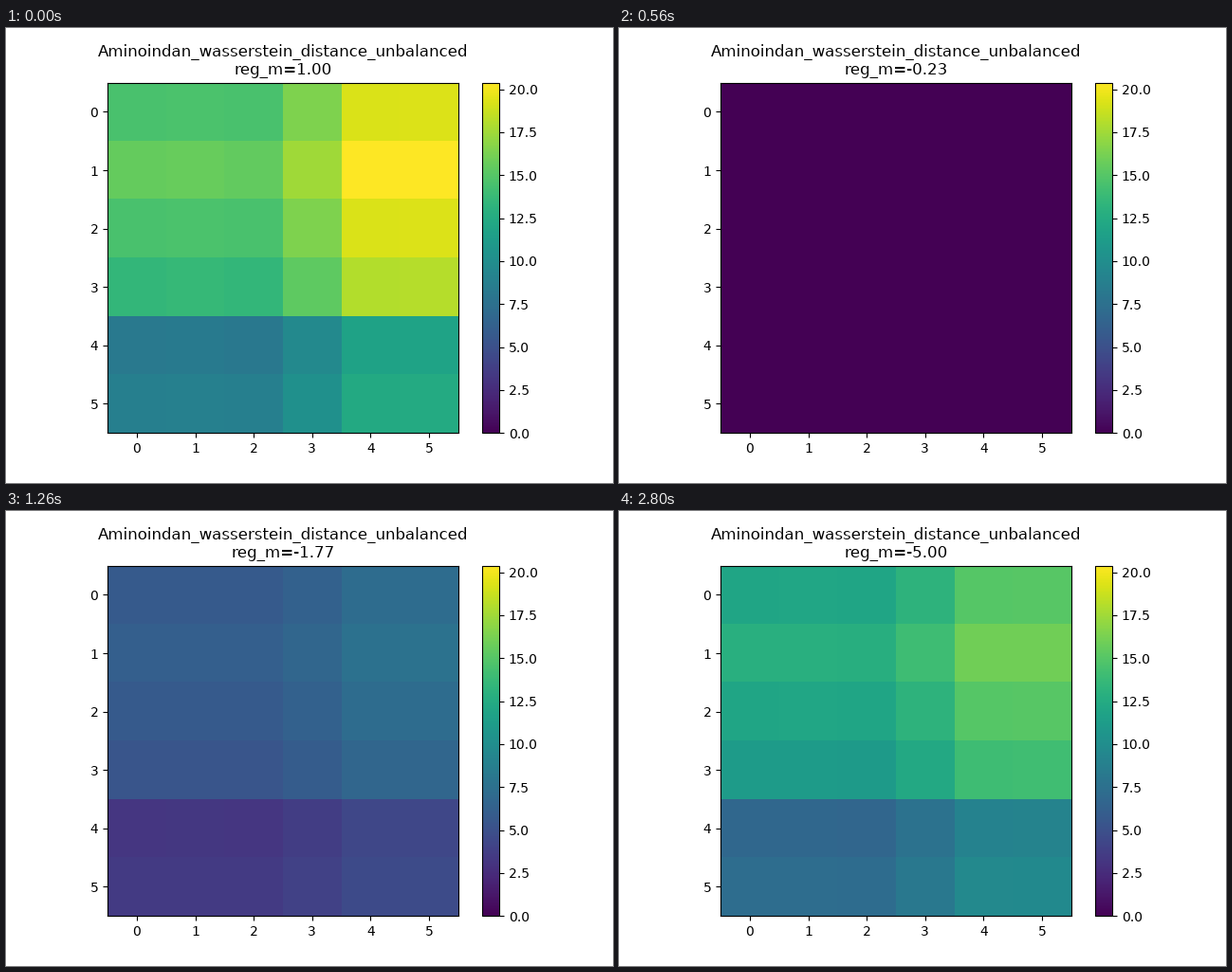
These frames come from a looping animation (640 px wide and 480 px high, 2940 ms). A matplotlib script:

```python
import numpy as np
import matplotlib.pyplot as plt
from matplotlib.animation import FuncAnimation

plt.rcParams["text.hinting"] = "native"
plt.rcParams["text.kerning_factor"] = 6

FRAMES, INTERVAL = 21, 140
VMAX = 20.39

# every second value of the sweep, closing on its last one
sweep = np.linspace(1, -5, 40)
regs = np.append(sweep[::2], sweep[-1])

# relative distance of each row, and what each column adds to it
ROWS = np.array([1, 1.07, 1, 0.93, 0.565, 0.605])[:, None]
COLS = np.array([0, 0.02, -0.01, 0.4, 1, 1.02])

# level over reg when positive, log level over 1 / |reg| when negative
rise = np.polyfit([0.077, 0.692, 1], [1.25, 11.95, 14.55], 2)
decay = np.polyfit([0.2, 0.371, 0.867], np.log([12, 8.65, 2.83]), 2)


def matrix(reg):
    spread = 0.32 if reg > 0 else 0.25
    pattern = ROWS + spread * np.sqrt(ROWS) * COLS
    if reg > 0:
        contrast = 1 - np.exp(-(reg / 0.3) ** 2)
        return np.polyval(rise, reg) * pattern ** contrast
    return np.exp(np.polyval(decay, -1 / reg)) * pattern


def caption(reg):
    return f"Aminoindan_wasserstein_distance_unbalanced\nreg_m={reg:.2f}"


fig, ax = plt.subplots(figsize=(6.4, 4.8), dpi=100)
image = ax.imshow(matrix(regs[0]), cmap="viridis", vmin=0, vmax=VMAX)
fig.colorbar(image, ax=ax)
title = ax.set_title(caption(regs[0]))


def update(i):
    image.set_data(matrix(regs[i]))
    title.set_text(caption(regs[i]))
    return image, title


anim = FuncAnimation(fig, update, frames=FRAMES, interval=INTERVAL,
                     repeat=True, repeat_delay=0, blit=False)
plt.show()
```
